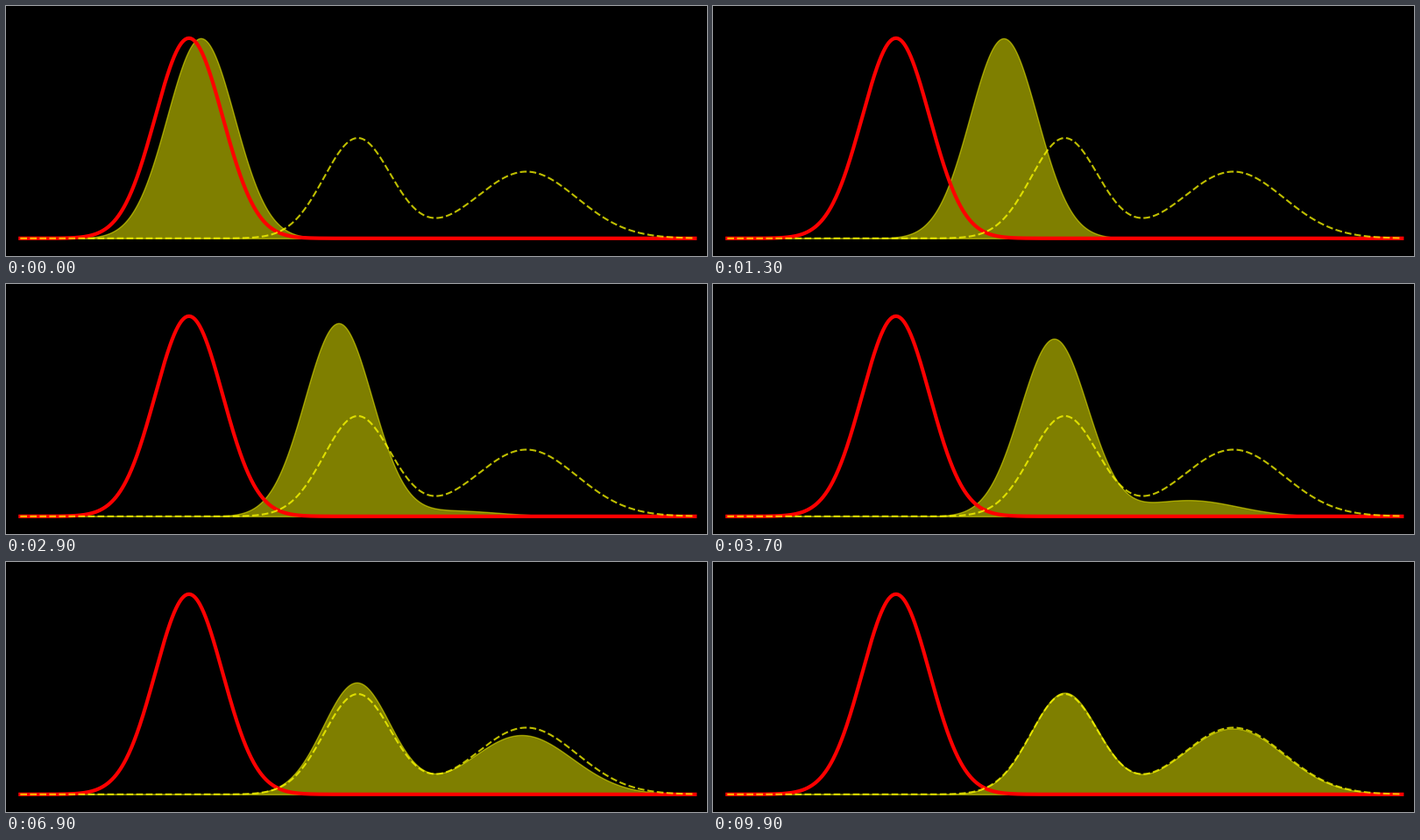
A matplotlib script that plays this animation: 800 by 286 pixels, repeating every 10 s.

```python
import numpy as np
import matplotlib.pyplot as plt
from matplotlib.animation import FuncAnimation

W, H, DPI = 800, 286, 128
FRAMES, INTERVAL = 100, 100
DECAY = 0.93                  # share of the start density kept per step
X0, Y0 = 401.3, 265.8         # pixel position of the data origin
SX, SY = 38.5, 574.0          # pixels per data unit


def px(width):
    """Convert pixels to points."""
    return width * 72 / DPI


def gauss(x, mean, std):
    z = (x - mean) / std
    return np.exp(-z**2 / 2) / (std * np.sqrt(2 * np.pi))


x = np.linspace(-10, 10, 1001)
start = gauss(x, -5, 1)
goal = 0.5 * gauss(x, 0, 1) + 0.5 * gauss(x, 5, 1.5)
log_start, log_goal = np.log(start), np.log(goal)


def density(step):
    """Normalised geometric path from start to goal."""
    a = DECAY ** step
    log_p = a * log_start + (1 - a) * log_goal
    p = np.exp(log_p - log_p.max())
    return p / (p.sum() * (x[1] - x[0]))


fig = plt.figure(figsize=(W / DPI, H / DPI), dpi=DPI, facecolor="black")
ax = fig.add_axes([0, 0, 1, 1])
ax.axis("off")
ax.set_xlim(-X0 / SX, (W - X0) / SX)
ax.set_ylim((Y0 - H) / SY, Y0 / SY)
ax.set_autoscale_on(False)

ax.plot(x, start, color="red", lw=px(4.17), zorder=2)
ax.plot(x, goal, "--", color="yellow", alpha=0.75, lw=px(2.08), zorder=3)
fills = []


def update(i):
    while fills:
        fills.pop().remove()
    fills.append(ax.fill_between(x, density(i + 1), color="yellow",
                                 alpha=0.5, lw=px(1.39), zorder=1))
    return fills


anim = FuncAnimation(fig, update, frames=FRAMES, interval=INTERVAL,
                     init_func=lambda: update(0), repeat=True,
                     repeat_delay=0, blit=False)
plt.show()
```
